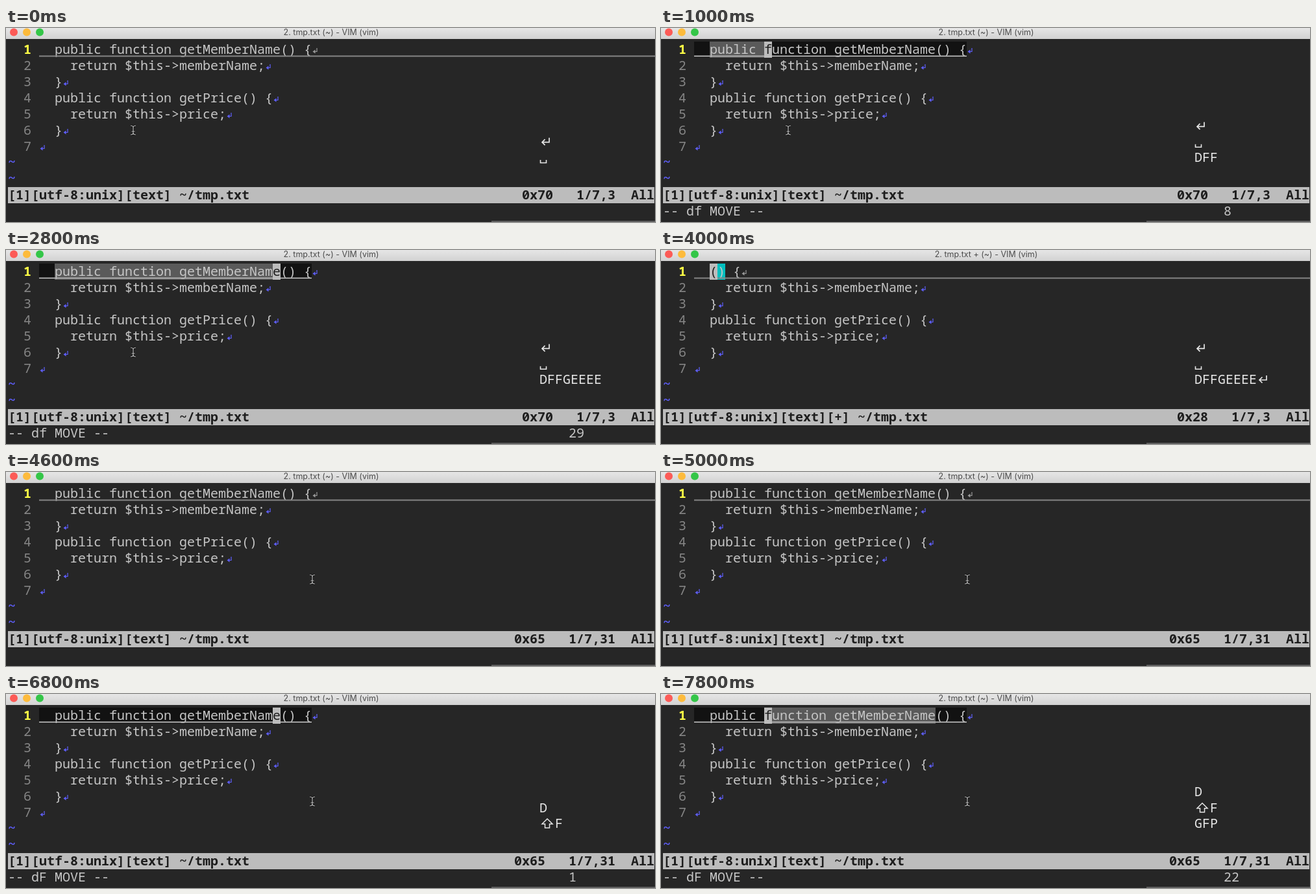
Recreate the animation shown at these times as an HTML page. Size 1000x300 px, loop 8 s.

```html
<!DOCTYPE html>
<html lang="en">
<head>
<meta charset="utf-8">
<title>Terminal</title>
<style>
  html, body { margin: 0; width: 1000px; height: 300px; overflow: hidden; background: #262626; }
  svg { display: block; }
  text { font: 500 20px 'Noto Sans Mono', 'DejaVu Sans Mono', monospace; white-space: pre; }
  .b { font-weight: 700; }
  #title { font: 12.5px Inter, 'Open Sans', sans-serif; fill: #4c4c4c; text-anchor: middle; }
</style>
</head>
<body>
<svg width="1000" height="300" viewBox="0 0 1000 300">
  <defs>
    <linearGradient id="bar" x2="0" y2="1">
      <stop offset="0" stop-color="#e6e6e6"/><stop offset="1" stop-color="#d2d2d2"/>
    </linearGradient>
  </defs>
  <rect width="1000" height="300" fill="#262626"/>
  <rect width="1000" height="17" fill="url(#bar)"/>
  <circle cx="12" cy="6.5" r="6" fill="#fc5b57"/>
  <circle cx="32" cy="6.5" r="6" fill="#fdbb3c"/>
  <circle cx="52" cy="6.5" r="6" fill="#34c648"/>
  <text id="title" x="501" y="11"></text>
  <rect x="748" y="298" width="252" height="2" fill="#5c5c5c"/>
  <g id="screen"></g>
</svg>
<script>
const LOOP = 8000, STEP = 200, W = 12, LEFT = 3, ROW = 25, TOP = 21;
const FG = '#c6c6c6', DARK = '#1e1e1e', BLOCK = '#bcbcbc', SEL = '#5a5a5a', BLUE = '#5f5fff';
const HEAD = '  public function getMemberName() {';
const BODY = [
  '    return $this->memberName;',
  '  }',
  '  public function getPrice() {',
  '    return $this->price;',
  '  }',
  ''
];

// Each entry changes part of the state from its time on.
const steps = [
  [0, { head: HEAD, dirty: '', hex: '0x70', col: 3, mode: '', cmd: '', at: 2, from: 2, mouse: [196, 158], keys: ['↵', '⎵'] }],
  [400, { keys: ['↵', '⎵', 'D'], cmd: 'd' }],
  [600, { keys: ['↵', '⎵', 'DF'], mode: 'df', cmd: '1' }],
  [1000, { keys: ['↵', '⎵', 'DFF'], at: 9, cmd: '8' }],
  [1400, { keys: ['↵', '⎵', 'DFFG'], at: 18, cmd: '17' }],
  [1800, { keys: ['↵', '⎵', 'DFFGE'], at: 19, cmd: '18' }],
  [2000, { keys: ['↵', '⎵', 'DFFGEE'], at: 22, cmd: '21' }],
  [2200, { keys: ['↵', '⎵', 'DFFGEEE'], at: 25, cmd: '24' }],
  [2600, { keys: ['↵', '⎵', 'DFFGEEEE'], at: 30, cmd: '29' }],
  [3400, { keys: ['↵', '⎵', 'DFFGEEEE↵'], head: '  () {', dirty: '+', hex: '0x28', mode: '', cmd: '', at: 2 }],
  [3800, { mouse: null }],
  [4600, { head: HEAD, dirty: '', hex: '0x65', col: 31, at: 30, from: 30, mouse: [472, 166], keys: [] }],
  [6200, { keys: ['D'], cmd: 'd' }],
  [6600, { keys: ['D', '⇧F'], mode: 'dF', cmd: '1' }],
  [7000, { keys: ['D', '⇧F', 'G'], at: 18, cmd: '13' }],
  [7400, { keys: ['D', '⇧F', 'GF'], at: 9, cmd: '22' }],
  [7800, { keys: ['D', '⇧F', 'GFP'] }]
];

const cellX = c => LEFT + c * W;
const rowY = r => TOP + r * ROW;
const esc = s => s.replace(/&/g, '&amp;').replace(/</g, '&lt;').replace(/>/g, '&gt;');
const rect = (x, y, w, h, fill) => `<rect x="${x}" y="${y}" width="${w}" height="${h}" fill="${fill}"/>`;
const line = (d, color, w) => `<path d="${d}" fill="none" stroke="${color}" stroke-width="${w}"/>`;
const label = (x, y, s, fill, bold) => `<text x="${x}" y="${y}" fill="${fill}"${bold ? ' class="b"' : ''}>${esc(s)}</text>`;
const text = (c, r, s, fill = FG, bold) => s ? label(cellX(c), rowY(r) + 19, s, fill, bold) : '';
const cells = (c, r, n, fill) => rect(cellX(c), rowY(r), n * W, ROW, fill);
const block = (c, r, ch, bg = BLOCK, fg = DARK) => cells(c, r, 1, bg) + text(c, r, ch, fg);

function eol(c, r, color = BLUE) {
  const x = cellX(c), y = rowY(r);
  return line(`M${x + 8} ${y + 10}v5.5h-4.5`, color, 1.2) +
    `<path d="M${x + 1.5} ${y + 15.5}l4 -3v6z" fill="${color}"/>`;
}

function keyRow(s, y) {
  const ink = '#e6e6e6';
  let x = 822, out = '', run = '';
  for (const ch of s) {
    if (ch === '↵') {
      out += line(`M${x + 15} ${y - 6}v7h-11m4.5 -4.5l-4.5 4.5l4.5 4.5`, ink, 1.7);
    } else if (ch === '⎵') {
      out += line(`M${x + 1.5} ${y + 4}v4.5h9v-4.5`, ink, 1.6);
    } else if (ch === '⇧') {
      out += line(`M${x + 12} ${y - 7}l8 8h-4.5v6h-7v-6h-4.5z`, ink, 1.5);
      x += W;
    } else {
      out += label(x, y + 7, ch, ink);
    }
    x += W;
  }
  return out;
}

function pointer([x, y]) {
  const d = `M${x - 4} ${y - 7}q4 0 4 3v8q0 3 -4 3M${x + 4} ${y - 7}q-4 0 -4 3v8q0 3 4 3M${x - 2.5} ${y + 2}h5`;
  return line(d, '#111', 3) + line(d, '#bdbdbd', 1.2);
}

function firstLine(s, blink) {
  const n = s.head.length, ch = s.head[s.at];
  const end = cellX(4 + n);
  let out = '';
  if (s.mode) {
    const a = Math.min(s.from, s.at), b = Math.max(s.from, s.at);
    out += cells(4, 0, n, '#121212') + cells(4 + a, 0, b - a + 1, SEL);
  } else if (s.dirty) {
    out += cells(6, 0, 2, '#00bfbf');
  }
  out += text(4, 0, s.head) + eol(4 + n, 0, s.mode ? BLUE : '#9a9a9a');
  out += rect(cellX(4), 42.5, (s.mode ? end : 1000) - cellX(4), 2, s.mode ? '#b0b0b0' : '#858585');
  if (s.mode || blink) out += block(4 + s.at, 0, ch);
  return out;
}

function draw(s, blink) {
  let out = firstLine(s, blink) + text(2, 0, '1', '#ffff45', true);
  BODY.forEach((l, i) => {
    out += text(2, i + 1, String(i + 2), '#858585') + text(4, i + 1, l) + eol(4 + l.length, i + 1);
  });
  for (const r of [7, 8]) out += label(LEFT, rowY(r) + 18, '~', BLUE, true);

  const pos = '1/7,' + s.col, shift = pos.length - 5;
  out += rect(LEFT, rowY(9), 996, ROW, BLOCK);
  out += text(0, 9, `[1][utf-8:unix][text]${s.dirty && '[+]'} ~/tmp.txt`, DARK, true);
  out += text(66 - shift, 9, s.hex, DARK, true) + text(73 - shift, 9, pos, DARK, true) + text(80, 9, 'All', DARK, true);

  if (s.mode) {
    out += text(0, 10, `-- ${s.mode} MOVE --`);
    if (blink) out += block(0, 10, '-');
  }
  out += text(72, 10, s.cmd);
  s.keys.forEach((k, i) => out += keyRow(k, 200 - 24.3 * (s.keys.length - 1 - i)));
  if (s.mouse) out += pointer(s.mouse);
  return out;
}

const screenEl = document.getElementById('screen');
const titleEl = document.getElementById('title');
let shown = -1;

function render(now) {
  const t = Math.floor(now % LOOP / STEP) * STEP;
  if (t !== shown) {
    shown = t;
    const s = Object.assign({}, ...steps.filter(e => e[0] <= t).map(e => e[1]));
    const phase = t % 900;
    screenEl.innerHTML = draw(s, phase >= 200 && phase < 500);
    titleEl.textContent = `2. tmp.txt ${s.dirty && '+ '}(~) - VIM (vim)`;
  }
}

const start = performance.now();
function tick() {
  render(performance.now() - start);
  requestAnimationFrame(tick);
}
tick();
</script>
</body>
</html>
```
